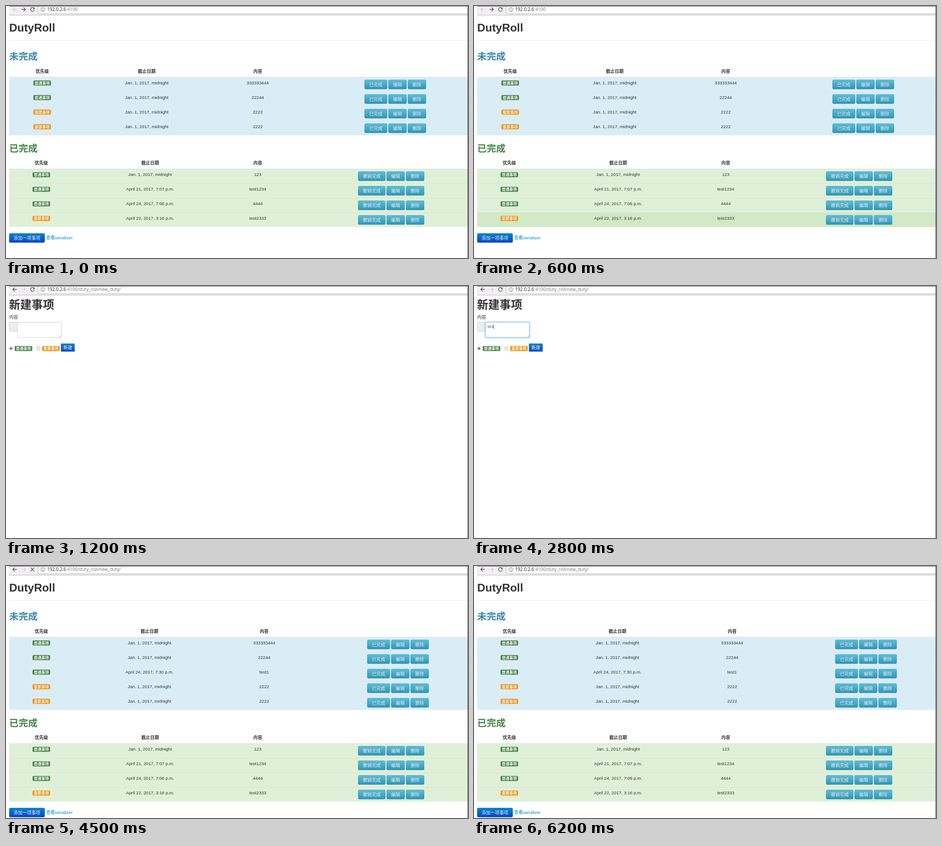
An HTML page that plays this animation: 1013 by 553 pixels, repeating every 8000 ms.

```html
<!DOCTYPE html>
<html lang="zh-CN">
<head>
<meta charset="utf-8">
<title>DutyRoll</title>
<style>
html, body { margin: 0; width: 100%; height: 100%; overflow: hidden; background: #fff; }
svg { display: block; width: 1013px; height: 553px; }
text { font: 9.7px "Liberation Sans", "Noto Sans CJK SC", "Noto Sans CJK", sans-serif; fill: #333; white-space: pre; }
.mid { text-anchor: middle; }
.bold { font-weight: bold; }
.url { font: 9.9px "Open Sans", sans-serif; fill: #777; }
.badge { font-size: 8.3px; font-weight: bold; fill: #fff; text-anchor: middle; text-shadow: 0 -.7px rgba(0,0,0,.25); }
.label { font-size: 9.8px; fill: #fff; text-anchor: middle; text-shadow: 0 -.7px rgba(0,0,0,.25); }
.glow { filter: drop-shadow(0 0 2.5px rgba(82,168,236,.6)); }
</style>
</head>
<body>
<svg id="stage" viewBox="0 0 1013 553">
  <defs>
    <linearGradient id="info" x2="0" y2="1"><stop stop-color="#5bc0de"/><stop offset="1" stop-color="#2f96b4"/></linearGradient>
    <linearGradient id="primary" x2="0" y2="1"><stop stop-color="#08c"/><stop offset="1" stop-color="#04c"/></linearGradient>
  </defs>
  <g id="view"></g>
</svg>
<script>
const LOOP = 8000;
const view = document.getElementById('view');

const rect = (x, y, w, h, fill, extra = '') =>
  `<rect x="${x}" y="${y}" width="${w}" height="${h}" fill="${fill}" ${extra}/>`;
const path = (d, stroke, width = 1.3) =>
  `<path d="${d}" fill="none" stroke="${stroke}" stroke-width="${width}"/>`;
const text = (x, y, str, cls = '', style = '') =>
  `<text x="${x}" y="${y}" class="${cls}" style="${style}">${str}</text>`;

// The value of the last step whose time has been reached.
const at = (t, steps) => steps.filter(([from]) => t >= from).pop()[1];

function button(x, y, w, h, label, fill = 'url(#info)', radius = 2.8) {
  return rect(x, y, w, h, fill, `rx="${radius}"`) +
    rect(x + .4, y + .4, w - .8, h - .8, 'none', `rx="${radius}" stroke="#000" stroke-opacity=".17" stroke-width=".8"`) +
    text(x + w / 2, y + h / 2 + 3.6, label, 'label');
}

function badge(cx, cy, important) {
  return rect(cx - 19.25, cy - 5.5, 38.5, 11, important ? '#f89406' : '#468847', 'rx="2"') +
    text(cx, cy + 3.1, important ? '重要事项' : '普通事项', 'badge');
}

function toolbar(t) {
  const moved = t >= 1100;
  const loading = (t >= 1000 && t < 1200) || (t >= 4300 && t < 4600);
  const dark = '#505050', pale = '#d0ced0';
  const reload = path('M61 4.4A4.2 4.2 0 1 0 62.1 8.6', dark) + `<path d="M62.8 2.8v4.2h-4.2z" fill="${dark}"/>`;
  return rect(7, 0, 1005, 20, '#f2eff2') + rect(7, 19.5, 1005, 1, '#b5b2b5') +
    rect(70.5, -2, 950, 19, '#fff', 'rx="2" stroke="#b5b2b5"') +
    path('M23.5 7.5H15M19 3.3L14.8 7.5 19 11.7', moved ? dark : pale) +
    path('M34 7.5h8.5M38.5 3.3L42.7 7.5 38.5 11.7', moved ? pale : dark) +
    (loading ? path('M54 3.5l8 8M62 3.5l-8 8', dark) : reload) +
    `<circle cx="81" cy="7.8" r="4.3" fill="none" stroke="#666"/>` + path('M81 7v3.2M81 5v1.1', '#666', 1) +
    text(90, 11.2, `<tspan fill="#222">192.0.2.6</tspan>:4100${moved ? '/duty_roll/new_duty/' : ''}`, 'url') +
    rect(7, 0, 1006, 1, '#555') + rect(1012, 0, 1, 553, '#444');
}

function table(y, columns, rows, theme, hovered) {
  const [badgeX, dateX, textX, buttonX] = columns;
  let out = text(7, y - 37.5, theme.title, 'bold', `font-size:20.8px;fill:${theme.ink}`) +
    ['优先级', '截止日期', '内容'].map((head, i) => text(columns[i], y - 8.7, head, 'mid bold')).join('');
  rows.forEach(([date, content, important], i) => {
    const top = y + i * 32;
    out += rect(7, top, 1005, 32, i === hovered ? theme.hover : theme.fill) +
      rect(7, top, 1005, .7, '#ddd') +
      badge(badgeX, top + 13.3, important) +
      text(dateX, top + 16, date, 'mid') + text(textX, top + 16, content, 'mid');
    let x = buttonX;
    for (const [label, width] of [theme.action, ['编辑', 40], ['删除', 40]]) {
      out += button(x, top + 6, width, 20.7, label);
      x += width + 2.6;
    }
  });
  return out;
}

const midnight = 'Jan. 1, 2017, midnight';
const openRows = [[midnight, '333333444'], [midnight, '22244'], [midnight, '2222', true], [midnight, '2222', true]];
const extendedRows = [...openRows.slice(0, 2), ['April 24, 2017, 7:30 p.m.', 'test1'], ...openRows.slice(2)];
const doneRows = [[midnight, '123'], ['April 21, 2017, 7:07 p.m.', 'test1234'],
  ['April 24, 2017, 7:06 p.m.', '4444'], ['April 22, 2017, 3:16 p.m.', 'test2333', true]];
const openTheme = { title: '未完成', ink: '#3a87ad', fill: '#d9edf7', hover: '#c4e3f3', action: ['已完成', 49.8] };
const doneTheme = { title: '已完成', ink: '#468847', fill: '#dff0d8', hover: '#d0e9c6', action: ['撤销完成', 59.8] };

function listPage(t) {
  const extended = t >= 4500;
  const shift = extended ? 32 : 0;
  const openHover = at(t, [[0, -1], [100, 0], [200, 3], [400, -1], [4600, 0], [5300, 1], [5600, 3], [6200, -1]]);
  const doneHover = at(t, [[0, -1], [400, 0], [500, 2], [600, 3], [700, -1]]);
  const addFill = at(t, [[0, 'url(#primary)'], [700, '#04c'], [800, '#003bb3'], [4500, 'url(#primary)']]);
  return text(7, 56.3, 'DutyRoll', 'bold', 'font-size:24.5px') +
    rect(7, 75, 1005, 1, '#eee') +
    table(155.7, extended ? [77.5, 314.5, 566, 792] : [79.3, 308.5, 552, 786],
      extended ? extendedRows : openRows, openTheme, openHover) +
    table(357 + shift, [77.5, 316, 552, 772], doneRows, doneTheme, doneHover) +
    button(7, 498.8 + shift, 78, 20.5, '添加一项事项', addFill) +
    text(88, 511.7 + shift, '查看serializer', '', 'fill:#08c');
}

function radio(x, checked) {
  return `<circle cx="${x}" cy="137" r="3.8" fill="#f0f0f0" stroke="#a8a8a8" stroke-width=".8"/>` +
    (checked ? `<circle cx="${x}" cy="137" r="2" fill="#444"/>` : '');
}

function formPage(t) {
  const typed = 'test1'.slice(0, at(t, [[0, 0], [2100, 1], [2300, 2], [2800, 3], [3000, 4], [3300, 5]]));
  const glow = at(t, [[0, 0], [1600, .4], [1700, .8], [2200, 1], [4200, .9], [4300, .6], [4400, .35]]);
  const advance = { t: .278, e: .556, s: .5, 1: .556 };
  const caretX = [...typed].reduce((x, char) => x + advance[char] * 9.7, 30);
  const box = (stroke, extra) => rect(25, 79.5, 96.5, 33.5, '#fff', `rx="2" stroke="${stroke}" ${extra}`);
  let out = text(6.5, 50.3, '新建事项', 'bold', 'font-size:24.8px') +
    text(7, 72, '内容') +
    rect(7, 79.5, 20, 19.7, '#eee', 'rx="2" stroke="#ccc"') +
    box('#ccc', '') + box('#75b9f0', `class="glow" opacity="${glow}"`) +
    path('M116.5 112l4-4M118.7 112l1.8-1.8', '#999', .7) +
    text(29.8, 92.2, typed, '', 'fill:#555');
  if (t >= 1600 && t < 3800) out += rect(caretX, 83.5, .8, 11, '#333');
  if (t >= 4300) out += path('M30 94' + 'l1 -1l1 1'.repeat(10), '#e33', .7);
  return out + radio(11, true) + badge(38.3, 137.3) + radio(71, false) + badge(98.5, 137.3, true) +
    button(120.5, 126.3, 30, 17.5, '新建', t >= 4000 ? '#04c' : 'url(#primary)', 0);
}

let shown = -1;
function frame(now) {
  const t = Math.floor(now % LOOP / 100) * 100;
  if (t !== shown) {
    shown = t;
    view.innerHTML = (t >= 1100 && t < 4500 ? formPage(t) : listPage(t)) + toolbar(t);
  }
  requestAnimationFrame(frame);
}
frame(0);
</script>
</body>
</html>
```
